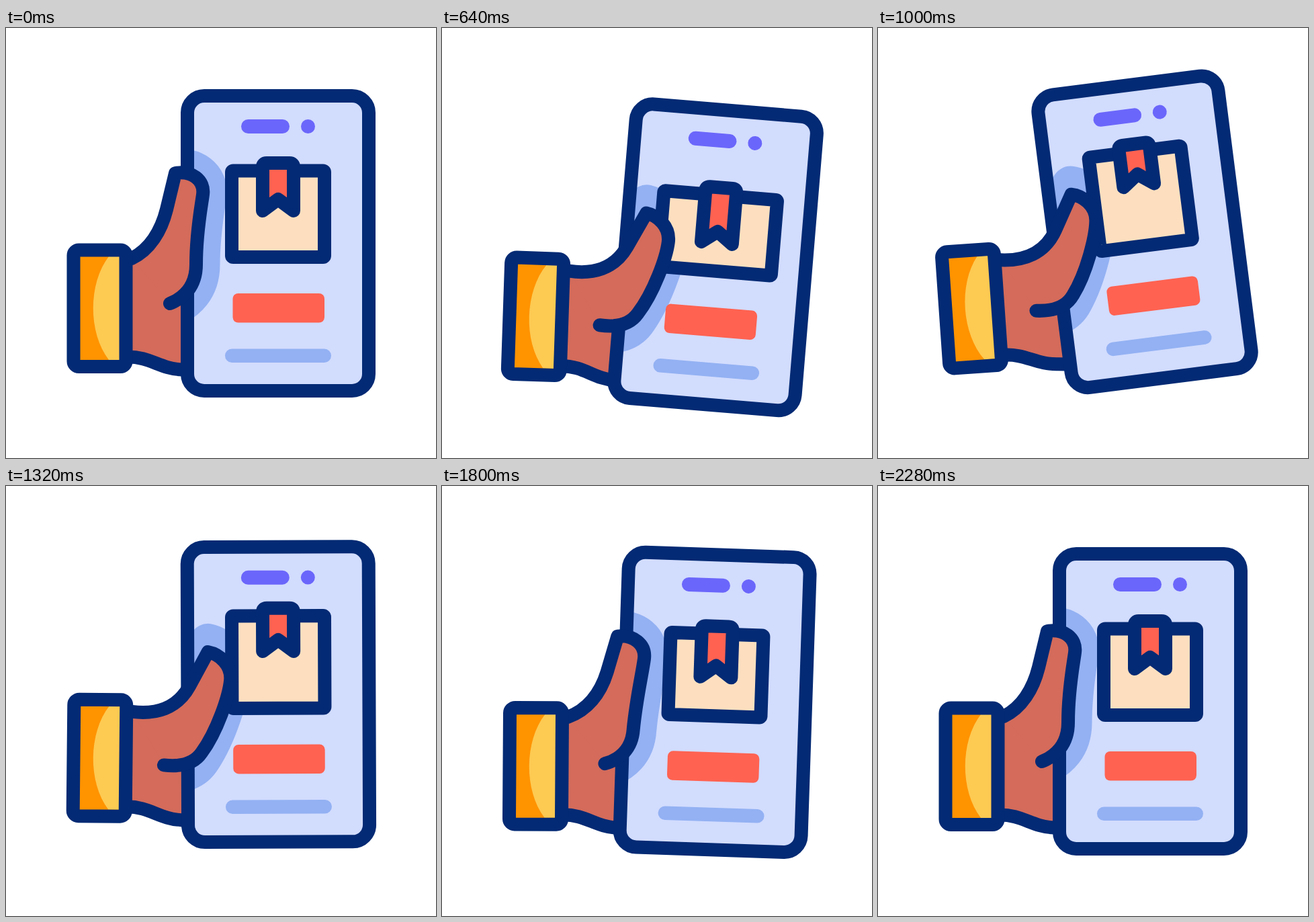
Write an HTML page that moves like this. It is 640 px wide and 640 px high and loops after 2640 ms.

```html
<!DOCTYPE html>
<html lang="en">
<head>
<meta charset="utf-8">
<title>Parcel order by phone</title>
<style>
  html, body { margin: 0; width: 100%; height: 100%; overflow: hidden; background: #fff; }
  svg { display: block; width: 100%; height: 100%; }
  .line { fill: none; stroke: #032a74; stroke-width: 20; stroke-linecap: round; stroke-linejoin: round; }
  .skin { fill: #d46b5b; }
  .screen { fill: #d2dcfd; }
  .shade { fill: #93b1f3; }
  .violet { fill: #6b66fb; }
  .red { fill: #ff6251; }
  .card { fill: #fddfbf; }
  #shadow { fill: none; stroke: #93b1f3; stroke-linecap: round; stroke-linejoin: round; }
</style>
</head>
<body>
<svg viewBox="0 0 640 640">
  <clipPath id="inside"><rect x="270" y="101" width="270" height="439" rx="25"/></clipPath>

  <g class="hand">
    <path class="skin" d="M180 343H187L250 400H285L290 511C230 507 215 489 180 489Z"/>
    <path class="line" d="M180 489.5C215 489 228 507 262 508.5L290 511"/>
  </g>

  <g id="phone">
    <rect class="screen" x="270" y="101" width="270" height="439" rx="25"/>
    <g clip-path="url(#inside)"><path id="shadow"/></g>
    <rect class="line" x="270" y="101" width="270" height="439" rx="25"/>
    <rect class="violet" x="350" y="136" width="72" height="21" rx="10.5"/>
    <circle class="violet" cx="449.5" cy="146.5" r="10.5"/>
    <rect class="red" x="337.5" y="395" width="136.5" height="43.5" rx="8"/>
    <rect class="shade" x="326" y="477.5" width="158" height="20.5" rx="10.2"/>
    <rect id="box" class="line card" rx="2"/>
    <path id="ribbon" class="line red"/>
  </g>

  <g class="hand">
    <path id="thumbFill" class="skin"/>
    <path id="thumb" class="line"/>
    <rect x="100.5" y="330.5" width="78" height="173.5" fill="#ff9300"/>
    <path d="M153 340C122 380 122 454 153 494H172V340Z" fill="#fdca52"/>
    <rect class="line" x="100.5" y="330.5" width="78" height="173.5" rx="8"/>
  </g>
</svg>
<script>
const LOOP = 2640, STEP = 40;
const UPRIGHT = 'M187 343C214 330 231 302 239 270L252 216C276 212 296 226 293 248S283 305 283 352C283 385 264 402 244 410';
const BENT = 'M187 348C222 352 254 343 272 309L299 258C316 261 335 277 333 300S314 376 291 408C281 423 262 430 235 427';

const $ = id => document.getElementById(id);
const set = (el, attrs) => { for (const k in attrs) el.setAttribute(k, attrs[k]); };

// eases from one [time, value] turning point to the next
function swing(t, ...turns) {
  const next = turns.findIndex(turn => t < turn[0]);
  if (next === 0) return turns[0][1];
  if (next < 0) return turns[turns.length - 1][1];
  const [t0, a] = turns[next - 1], [t1, b] = turns[next];
  return a + (b - a) * (1 - Math.cos(Math.PI * (t - t0) / (t1 - t0))) / 2;
}

// outline part of the way from upright to bent
function thumbPath(bend) {
  const ends = BENT.match(/\d+/g);
  let i = 0;
  return UPRIGHT.replace(/\d+/g, n => +n + (ends[i++] - n) * bend);
}

function draw(t) {
  const angle = swing(t, [240, 0], [600, 5], [1040, -7.5], [1540, 4.8], [2000, 0]);
  const x = swing(t, [200, 0], [540, 3.3], [1020, -8], [1480, 3.5], [2000, 0]);
  const lift = swing(t, [200, 0], [600, 18], [1120, -16.5], [1590, 0]);
  const y = lift + 40 * Math.sin(angle * Math.PI / 180);
  const squash = swing(t, [200, 0], [600, 16], [1090, -14.5], [1760, 6.5], [2280, 0]);
  const widen = swing(t, [200, 0], [600, 16], [1000, 0]);
  const tilt = swing(t, [200, 0], [560, 2.4], [1010, -4], [1500, 2.5], [1900, 0]);
  const handY = swing(t, [220, 0], [680, 12.3], [1340, -12.6], [1860, 0]);
  const bend = swing(t, [180, 0], [620, 1], [1400, 1], [1950, 0]);

  const hand = `translate(0 ${handY}) rotate(${tilt} 139.5 417)`;
  const undoPhone = `rotate(${-angle} 405 320.5) translate(${-x} ${-y})`;
  document.querySelectorAll('.hand').forEach(g => set(g, { transform: hand }));
  set($('phone'), { transform: `translate(${x} ${y}) rotate(${angle} 405 320.5)` });

  const d = thumbPath(bend);
  set($('thumbFill'), { d });
  set($('thumb'), { d });
  // the shadow is a wide, slightly stretched outline of the thumb
  const stretch = 1 + .1 * bend;
  set($('shadow'), {
    d, 'stroke-width': 71 - 11 * bend,
    transform: `${undoPhone} ${hand} translate(0 ${350 * (1 - stretch)}) scale(1 ${stretch})`
  });

  set($('box'), { x: 336 - widen, y: 212.5 + squash, width: 138 + 2 * widen, height: 128.5 - squash });
  const top = 201 + squash, low = 272 + 1.75 * squash;
  set($('ribbon'), {
    d: `M382 ${top + 6}q0 -6 6 -6H422q6 0 6 6V${low}L405 ${low - 17}L382 ${low}Z`
  });
}

const start = performance.now();
function tick() {
  const t = (performance.now() - start) % LOOP;
  draw(Math.floor(t / STEP) * STEP);
  requestAnimationFrame(tick);
}
tick();
</script>
</body>
</html>
```
